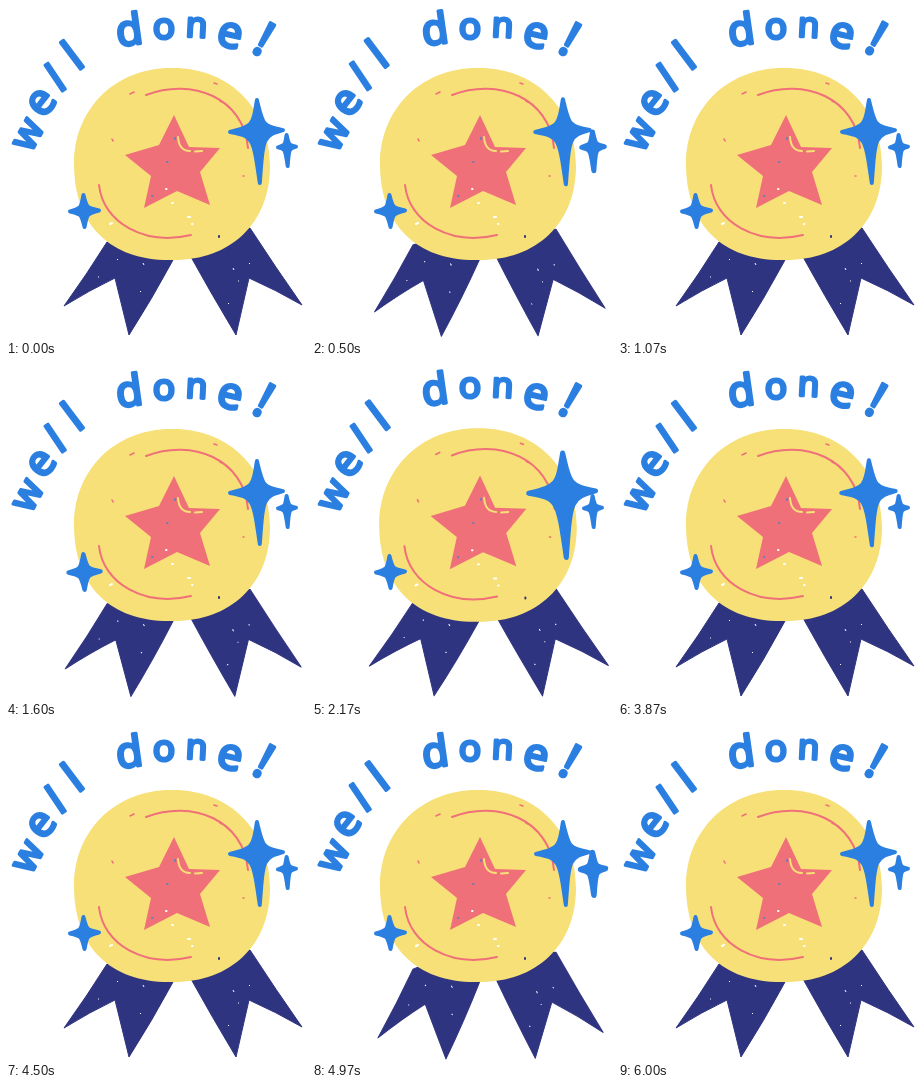
Animation of 300 by 333 pixels, one loop 6060 ms. Source, as an HTML page:

```html
<!DOCTYPE html>
<html lang="en">
<head>
<meta charset="utf-8">
<title>Well done</title>
<style>
  html, body { margin: 0; width: 100%; height: 100%; overflow: hidden; background: #fff; }
  svg { display: block; width: 100%; height: 100%; }
  text { font-family: "Noto Sans", "Open Sans", sans-serif; text-anchor: middle; }
</style>
</head>
<body>
<svg viewBox="0 0 300 333">
  <g fill="#2f3480" stroke="#2f3480" stroke-linejoin="round">
    <g id="ribbonLeft">
      <path d="M101 236 Q81 268 58 300 Q84 284 109 272 L123 329 Q146 293 167 254 L140 225Z"/>
      <path d="M137 257l1 2M111 253l1 1M134 285l1 1M92 271l1 0" stroke="#fff"/>
    </g>
    <g id="ribbonRight">
      <path d="M185 251 Q206 289 230 329 L243 272 Q270 284 296 299 Q270 262 244 222 L210 225Z"/>
      <path d="M227 262l1 2M243 257l1 1M222 297l1 1M232 275l1 0" stroke="#fff"/>
    </g>
  </g>
  <g id="medal">
    <path fill="#f7e077" d="M68 158C68 104 108 62 165 62C224 61 264 103 264 160C264 218 224 254 168 254C108 256 68 222 68 158Z"/>
    <g fill="none" stroke="#f0707a" stroke-width="2" stroke-linecap="round">
      <path d="M140 89C186 71 238 92 242 142M93 179C97 217 139 240 185 229"/>
      <path d="M208 77l3 1M214 95l2 1M106 133l1 2M237 170l1 0M124 88l4 -2" stroke-width="1.6"/>
    </g>
    <path fill="#f0707a" d="M168 109L183 141L214 142L194 166L204 199L171 185L138 202L145 170L119 149L153 139Z"/>
    <g fill="none" stroke-linecap="round" stroke-width="2">
      <path stroke="#f7e077" d="M172 131Q173 145 184 145M189 145.500L196 145"/>
      <path stroke="#2f3480" d="M213 230v1"/>
      <path stroke="#6a7fb5" d="M146 190h.5M169 132v1M161 156h.5"/>
      <path stroke="#fff" d="M182 211l2 0M166 197h1M186 218h.5M160 183h.5M104 218l2 -1"/>
    </g>
  </g>
  <g id="sparks" fill="#2a7fe0" stroke="#2a7fe0" stroke-width="4" stroke-linejoin="round"></g>
  <g id="words" fill="#2a7fe0" stroke="#2a7fe0" stroke-width="3" stroke-linejoin="round"></g>
</svg>
<script>
const LOOP = 6060, CYCLE = 19;
const byId = id => document.getElementById(id);

function add(parent, tag, attrs, content = "") {
  const node = document.createElementNS("http://www.w3.org/2000/svg", tag);
  for (const name in attrs) node.setAttribute(name, attrs[name]);
  node.textContent = content;
  return parent.appendChild(node);
}

// Four-pointed sparkle around the origin, its sides pulled in towards the centre
function sparkPath(up, right, down, left) {
  const c = Math.min(left, right) * 0.2;
  const side = (x, y, toX, toY) => `C${x} ${y} ${x} ${y} ${toX} ${toY}`;
  return `M0 ${-up}` + side(c, -c, right, 0) + side(c, c, 0, down) +
    side(-c, c, -left, 0) + side(-c, -c, 0, -up) + "Z";
}

const sparks = [
  { x: 78, y: 205, arms: [16, 15, 16, 14], peak: 2.5, grow: 0.3 },
  { x: 281, y: 141, arms: [12, 9, 19, 9], peak: 5, grow: 0.38 },
  { x: 252, y: 125, arms: [31, 25, 52, 28], peak: 8, grow: 0.26 }
].map(s => ({ ...s, node: add(byId("sparks"), "path", { d: sparkPath(...s.arms) }) }));

// Character, baseline position, rotation, font size
const letters = [
  ["w", 32, 134, -62, 38], ["e", 45, 104, -52, 43], ["l", 58, 84, -34, 41],
  ["l", 76, 62, -37, 44], ["d", 125, 39, -8, 43], ["o", 158, 33, 0, 37],
  ["n", 190, 31, 3, 35], ["e", 221, 41, 13, 44], ["!", 250, 48, 29, 48]
].map(([char, x, y, turn, size], i) => ({
  x, y, turn, peak: 3 + i * 1.1,
  node: add(byId("words"), "text", { "font-size": size }, char)
}));

// Smooth pulse, 1 at the peak and 0 beyond the half width
function bump(phase, peak, half) {
  const d = Math.abs(phase - peak) / half;
  return d < 1 ? Math.cos(d * Math.PI / 2) ** 2 : 0;
}

function draw(time) {
  // 12.5 poses per second, shown on a 30 Hz grid
  const tick = Math.floor((time % LOOP) * 0.03 + 0.02);
  const phase = Math.floor(tick * 5 / 12 + 1e-6) % CYCLE;

  // Ribbons swing in, drop a little and settle past their rest
  const swing = bump(phase, 4, 4) - 0.07 * bump(phase, 8, 2);
  const drop = 1.5 * swing;
  byId("ribbonLeft").setAttribute("transform", `translate(0 ${drop}) rotate(${-8 * swing} 134 238)`);
  byId("ribbonRight").setAttribute("transform", `translate(0 ${drop}) rotate(${4.2 * swing} 228 222)`);

  const swell = 1 + 0.008 * bump(phase, 8, 2);
  byId("medal").setAttribute("transform", `translate(166 158) scale(${swell}) translate(-166 -158)`);

  for (const s of sparks) {
    const size = 1 + s.grow * bump(phase, s.peak, 2.5);
    s.node.setAttribute("transform", `translate(${s.x} ${s.y}) rotate(-2) scale(${size})`);
  }
  // A hop runs through the lettering from left to right
  for (const l of letters) {
    const hop = -2 * bump(phase, l.peak, 2.5);
    l.node.setAttribute("transform", `translate(${l.x} ${l.y}) rotate(${l.turn}) translate(0 ${hop})`);
  }
}

const start = performance.now();
function loop() {
  draw(performance.now() - start);
  requestAnimationFrame(loop);
}
loop();
</script>
</body>
</html>
```
